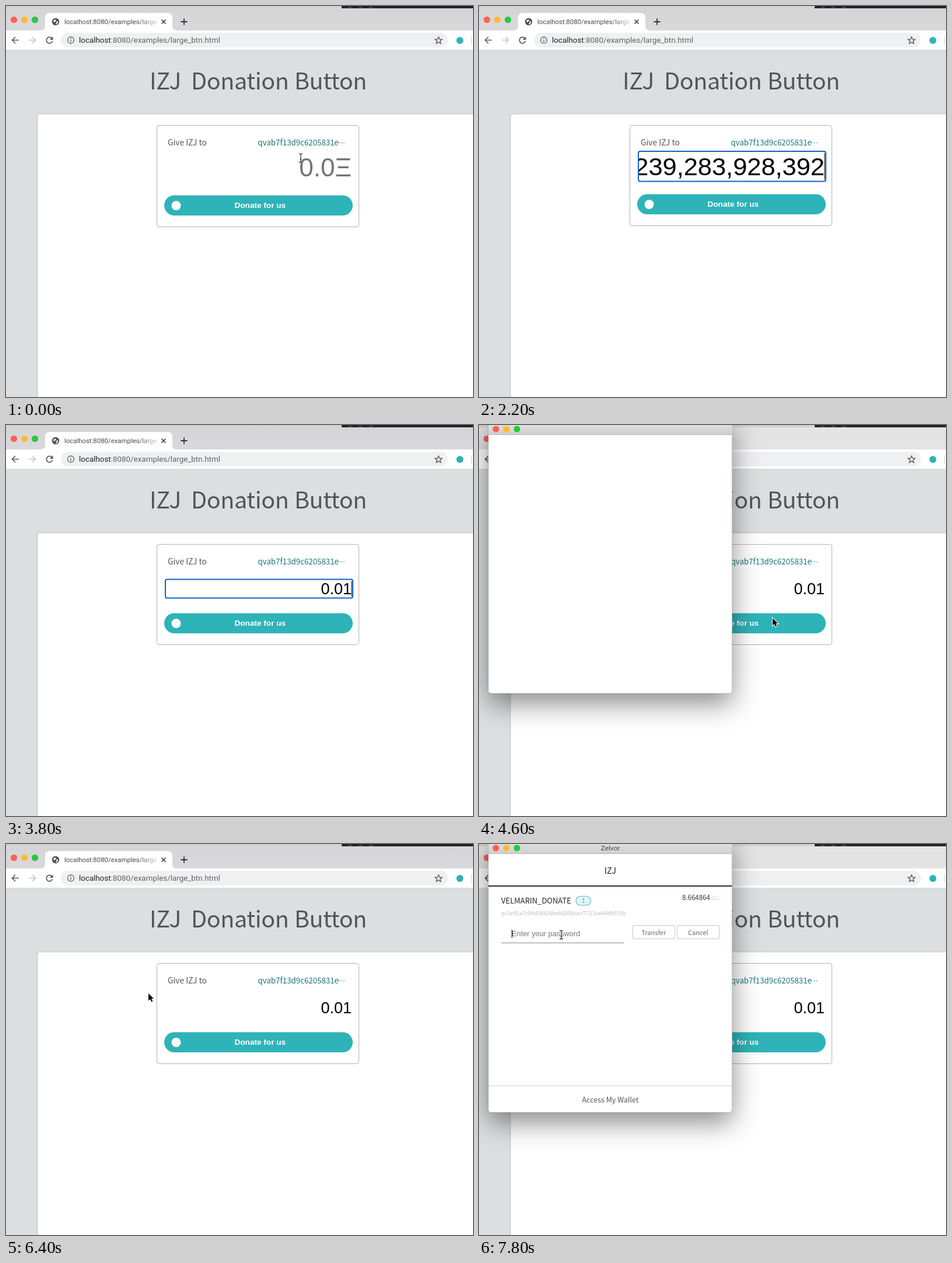
Animation of 800 by 670 pixels, one loop 8000 ms. Source, as an HTML page with a canvas:

```html
<!DOCTYPE html>
<html lang="en">
<head>
<meta charset="utf-8">
<title>Donation button</title>
<style>
  html, body { margin: 0; width: 100%; height: 100%; overflow: hidden; background: #fff; }
  canvas { display: block; width: 800px; height: 670px; }
</style>
</head>
<body>
<canvas id="stage"></canvas>
<script>
const W = 800, H = 670, LOOP = 8000, STEP = 200;
const canvas = document.getElementById('stage');
const ctx = canvas.getContext('2d');
const ratio = window.devicePixelRatio || 1;
canvas.width = W * ratio;
canvas.height = H * ratio;

const SANS = '"Noto Sans CJK KR", "Noto Sans CJK JP", "Noto Sans", sans-serif';
const UI = 'Roboto, sans-serif';
const ARIAL = '"Liberation Sans", Arial, sans-serif';
const TEAL = '#2eb3b8';
const COIN = 'IZJ';
const ADDRESS = 'qv3e91a7c04d58b26fedd208bacf7713ae64d9015b';

// What the amount field holds from each time on: [time, value, font size]
const BIG = 43.4, SMALL = 27;
const TYPED = [
  [0, '', 44], [1400, '23', BIG], [1600, '239,2', BIG], [1800, '239,283', BIG],
  [2000, '239,283,92', BIG], [2200, '239,283,928,392', BIG],
  [2400, '239,283,928,392,839', 33], [2600, '239,283,928,392,839,238', SMALL],
  [2800, '', SMALL], [3000, '0', SMALL], [3200, '0.', SMALL],
  [3400, '0.0', SMALL], [3600, '0.01', SMALL]
];

// Pointer path: [time, x, y, shape]
const POINTER = [
  [0, 505, 261, 'beam'], [400, 505, 261, 'beam'], [800, 498, 276, 'beam'],
  [1400, 498, 276, ''], [4000, 512, 300, 'arrow'], [4200, 503, 331, 'hand'],
  [4400, 503, 331, 'arrow'], [4800, 503, 331, 'arrow'], [5400, 130, 160, 'arrow'],
  [5600, 64, 116, 'hand'], [5800, 47, 108, 'hand'], [6000, 318, 424, 'hand'],
  [6200, 300, 380, 'arrow'], [6400, 244, 256, 'arrow'], [6800, 165, 180, 'arrow'],
  [7200, 143, 158, 'arrow'], [7400, 141, 156, 'beam'], [8000, 141, 156, 'beam']
];

const lastBefore = (list, t) => list.filter(k => k[0] <= t).pop();

function text(str, x, y, size, color, family = SANS, align = 'left', weight = 400) {
  ctx.font = `${weight} ${size}px ${family}`;
  ctx.textAlign = align;
  ctx.fillStyle = color;
  ctx.fillText(str, x, y);
}

function rect(x, y, w, h, color) {
  ctx.fillStyle = color;
  ctx.fillRect(x, y, w, h);
}

function box(x, y, w, h, r, fill, stroke, width = 1) {
  ctx.beginPath();
  ctx.roundRect(x, y, w, h, r);
  paint(fill, stroke, width);
}

function circle(x, y, r, fill, stroke, width = 1) {
  ctx.beginPath();
  ctx.arc(x, y, r, 0, Math.PI * 2);
  paint(fill, stroke, width);
}

function shape(d, x, y, fill, stroke, width = 1) {
  ctx.save();
  ctx.translate(x, y);
  const path = new Path2D(d);
  if (stroke) {
    ctx.strokeStyle = stroke;
    ctx.lineWidth = width;
    ctx.stroke(path);
  }
  if (fill) {
    ctx.fillStyle = fill;
    ctx.fill(path);
  }
  ctx.restore();
}

function paint(fill, stroke, width) {
  if (fill) {
    ctx.fillStyle = fill;
    ctx.fill();
  }
  if (stroke) {
    ctx.strokeStyle = stroke;
    ctx.lineWidth = width;
    ctx.stroke();
  }
}

function gradient(x0, y0, x1, y1, from, to) {
  const g = ctx.createLinearGradient(x0, y0, x1, y1);
  g.addColorStop(0, from);
  g.addColorStop(1, to);
  return g;
}

function lights(x, y, r) {
  ['#fe5f57', '#febb2e', '#28c840'].forEach((c, i) => circle(x + i * 18, y, r, c));
}

function browser(active) {
  rect(0, 0, W, 5, '#d2d2d3');
  rect(575, 0, 225, 5, '#262129');
  for (let i = 0; i < 3; i++) circle(589 + i * 18, 5, 4, '#47434a');
  rect(0, 4, W, 38, active ? gradient(0, 4, 0, 42, '#d5d5d7', '#d9d9db') : '#e4e4e5');
  rect(0, 42, W, 33, '#fff');

  lights(13.5, 23.5, 5.6);
  shape('M59 42Q67 42 67 34V20Q67 12 75 12H277Q285 12 285 20V34Q285 42 293 42Z', 0, 0, '#fff');
  circle(85, 27, 6.2, '#4d5054');
  shape('M-4-2L0-4L1-2L-1 0L-3 1ZM1 0L4-1L4 2L1 5L0 3L2 2Z', 85, 27, '#fff');
  text('localhost:8080/examples/large', 100, 31, 11.4,
    gradient(228, 0, 260, 0, '#45484c', '#e0e0e1'), UI);
  shape('M-3.5-3.5L3.5 3.5M3.5-3.5L-3.5 3.5', 270, 27, null, '#333', 1.5);
  shape('M-5.5 0H5.5M0-5.5V5.5', 305, 27, null, '#333', 1.8);

  shape('M6 0H-5M0-5.5L-5.5 0L0 5.5', 16, 58.5, null, '#55585c', 1.6);
  shape('M-6 0H5M0-5.5L5.5 0L0 5.5', 45, 58.5, null, '#c3c5c8', 1.6);
  shape('M4.2-3A5.2 5.2 0 1 0 5 1.6', 74.5, 58.5, null, '#55585c', 1.7);
  shape('M6-6.3V-.6H.3Z', 74.5, 58.5, '#55585c');

  box(94, 46, 663, 25, 12.5, '#eff0f2');
  circle(111, 58.5, 5.5, null, '#5f6368', 1.3);
  rect(110.3, 58, 1.4, 3.6, '#5f6368');
  rect(110.3, 55.4, 1.4, 1.5, '#5f6368');
  text('localhost', 125, 63, 13.4, '#202124', UI);
  const host = ctx.measureText('localhost').width;
  text(':8080/examples/large_btn.html', 125 + host, 63, 13.4, '#5f6368', UI);
  shape('M0-6L1.7-2L6-1.7L2.7 1.1L3.8 5.3L0 3L-3.8 5.3L-2.7 1.1L-6-1.7L-1.7-2Z',
    741, 59, null, '#4d5054', 1.3);
  circle(777.5, 59, 6, TEAL);
  rect(797, 52, 1, 14, '#d0d1d3');
}

function amount(t) {
  const [, value, size] = lastBefore(TYPED, t);
  const base = t < 1400 ? 292 : 290;
  const top = base - 25.5 - (size - SMALL) * 0.95;
  const bottom = base + 6.5 + (size - SMALL) * 0.25;

  ctx.save();
  ctx.beginPath();
  ctx.rect(274, 240, 320, 70);
  ctx.clip();
  text(value || '0.0Ξ', 592, base, size, value ? '#000' : '#757575', ARIAL, 'right');
  ctx.restore();

  if (t >= 800 && t < 4200) {
    box(273, top, 321, bottom - top, 3, null, '#0f62c6', 2);
    rect(591.4, top + 3, 1, bottom - top - 6, '#000');
  }
}

function page(t) {
  rect(0, 75, W, H - 75, '#dbdfe0');
  rect(0, 75, W, 1, '#d3d6d7');
  ctx.letterSpacing = '-0.4px';
  text(COIN, 246, 142.5, 39.5, '#555');
  text('Donation', 317, 142.5, 39.5, '#555');
  text('Button', 494, 142.5, 39.5, '#555');
  ctx.letterSpacing = '0px';

  ctx.save();
  ctx.shadowColor = 'rgba(0,0,0,.22)';
  ctx.shadowBlur = 3 * ratio;
  box(54.5, 185.5, 800, 520, 4, '#fff');
  ctx.restore();

  const lift = t < 1400 ? 0 : 2;
  box(258.5, 204.5, 346, 174 - lift, 4, '#fff', '#b0b0b0');
  text(`Give ${COIN} to`, 277, 239, 13.8, '#555');
  text('qvab7f13d9c6205831e', 431.5, 239, 13.3, '#1b7377');
  for (let i = 0; i < 3; i++) circle(570.5 + i * 4.2, 234.5, 0.8, '#1b7377');
  amount(t);
  box(271, 324.5 - lift, 323, 34.5, 17.3, TEAL);
  circle(291.5, 342 - lift, 8, '#fff');
  text('Donate for us', 435.3, 346 - lift, 13.6, '#fff', ARIAL, 'center', 700);
}

function popupFrame() {
  ctx.save();
  ctx.shadowColor = 'rgba(0,0,0,.46)';
  ctx.shadowBlur = 46 * ratio;
  ctx.shadowOffsetY = 17 * ratio;
  box(16, -14, 417.5, 474, 5, '#fff');
  ctx.restore();
  box(16, -14, 417.5, 474, 5, '#fff', 'rgba(0,0,0,.25)', 0.8);
  rect(16, 0, 417.5, 16, gradient(0, 0, 0, 16, '#dedede', '#d0d0d0'));
  rect(16, 16, 417.5, 1, '#b3b3b3');
  lights(29, 7, 5.6);
}

function account(x, linked) {
  text('VELMARIN_DONATE', x, 102, 13, '#222', SANS, 'left', 500);
  box(x + 128, 89.5, 25.5, 15.5, 7.7, '#e3f3f4', '#5fc0c4', 1.2);
  text('1', x + 140.7, 101, 10, TEAL, SANS, 'center');
  text('8.664864', 348, 96, 11.5, '#333');
  text(COIN, 399, 96, 8.5, '#c4c4c4');
  text(ADDRESS, x, 122, 9.2, linked ? '#444' : '#bcbcbc');
  if (linked) rect(x, 123.5, ctx.measureText(ADDRESS).width, 1, '#555');
}

function popupHead() {
  text('Zelvor', 225, 11, 11.8, '#444', UI, 'center');
  text(COIN, 225, 50.5, 14.6, '#222', SANS, 'center');
  rect(16, 71, 417.5, 2, '#2b2b2b');
}

function chooser(picked) {
  popupHead();
  account(64, true);
  circle(47, 109.5, 8.6, '#fff', picked ? TEAL : '#c9c9c9', 1.1);
  if (picked) circle(47, 109.5, 4.5, TEAL);
  rect(34, 409, 189, 32, '#e6e7e8');
  rect(227, 409, 188.5, 32, '#222');
  text('Cancel', 128.8, 430.5, 12.8, '#333', SANS, 'center');
  text('Confirm', 321, 430.5, 12.8, '#fff', SANS, 'center');
}

function transfer(focused) {
  popupHead();
  account(38, false);
  text('Enter your password', 56, 158, 12.8, '#777', ARIAL);
  if (focused) rect(56, 147, 1, 14, '#000');
  rect(38, 169, 210.5, 1, '#8a8a8a');
  box(263.5, 139.5, 72, 23, 1, '#fff', '#c8c8c8');
  box(339.5, 139.5, 72, 23, 1, '#fff', '#c8c8c8');
  text('Transfer', 299.3, 156, 11, '#666', SANS, 'center');
  text('Cancel', 375.3, 156, 11, '#666', SANS, 'center');
  rect(16, 414, 417.5, 1, '#d0d0d0');
  text('Access My Wallet', 225, 443, 12.5, '#555', SANS, 'center');
}

const DRAW_POINTER = {
  beam(x, y) {
    const d = 'M-3-8Q0-8 0-6Q0-8 3-8M0-6V5M-3 7Q0 7 0 5Q0 7 3 7M-1.5 2H1.5';
    shape(d, x, y, null, '#fff', 2.4);
    shape(d, x, y, null, '#111', 1.1);
  },
  arrow(x, y) {
    shape('M0 0V12.6L3 9.9L5.1 14.6L7.3 13.6L5.2 9H9Z', x, y, '#000', '#fff', 2);
  },
  hand(x, y) {
    shape('M1 1Q2.5-.8 3.7 1L5 5Q7 3.8 8 5.2Q10 4.4 10.6 6Q12.4 5.8 12.6 7.6' +
      'V11L11 16H4.7L0 10.4Q-.4 8.4 1.6 8.8L2.8 9.7Z', x, y, '#fff', '#111', 2);
    shape('M5.6 9V13M7.8 9V13M10 9V13', x, y, null, '#222', 0.9);
  }
};

function pointer(t) {
  const a = lastBefore(POINTER, t);
  if (!a[3]) return;
  const b = POINTER[POINTER.indexOf(a) + 1] || a;
  const k = b === a ? 0 : (t - a[0]) / (b[0] - a[0]);
  DRAW_POINTER[a[3]](a[1] + (b[1] - a[1]) * k, a[2] + (b[2] - a[2]) * k);
}

function draw(t) {
  const first = t >= 4400 && t < 6200;
  const second = t >= 6800;
  ctx.setTransform(ratio, 0, 0, ratio, 0, 0);
  ctx.clearRect(0, 0, W, H);
  page(t);
  browser(!first && !second);
  if (first || second) popupFrame();
  if (first && t >= 5000) chooser(t >= 5800);
  if (second && t >= 7400) transfer(t >= 7600);
  pointer(t);
}

function tick(now) {
  draw(Math.floor((now % LOOP) / STEP) * STEP);
  requestAnimationFrame(tick);
}
requestAnimationFrame(tick);
</script>
</body>
</html>
```
